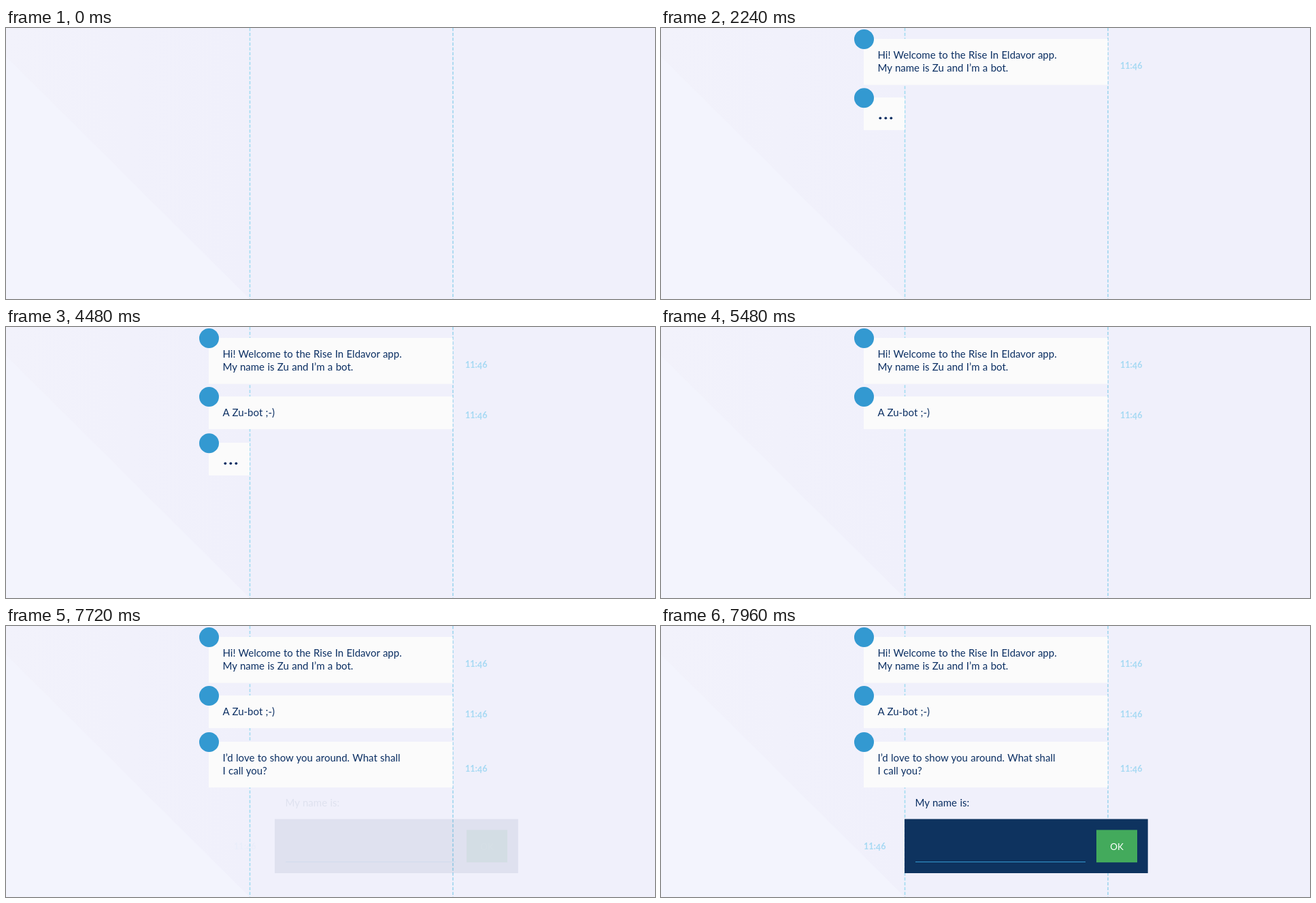
Recreate the animation shown at these times as an HTML page. Size 954x398 px, loop 8000 ms.

```html
<!DOCTYPE html>
<html lang="en">
<head>
<meta charset="utf-8">
<title>Chat intro</title>
<style>
  html, body { margin: 0; width: 100%; height: 100%; overflow: hidden; background: #f0f0fb; }
  svg { display: block; width: 100%; height: 100%; }
  text { font: 15px Lato, "Open Sans", sans-serif; word-spacing: 0.5px; fill: #0b2f63; white-space: pre; }
  .stamp { font-size: 12.6px; font-weight: 700; fill: #a6d9f3; }
  .ok { font-size: 13.4px; fill: #fff; text-anchor: middle; }
  .guide { stroke-width: 1.6; stroke-dasharray: 4.6 2.5; }
</style>
</head>
<body>
<svg id="stage" viewBox="0 0 954 398">
  <defs>
    <linearGradient id="haze">
      <stop stop-color="#f2f2fb"/>
      <stop offset="1" stop-color="#f0f0fb"/>
    </linearGradient>
  </defs>
  <rect width="954" height="398" fill="#f0f0fb"/>
  <rect width="358" height="398" fill="url(#haze)"/>
  <path d="M0 42L358 398H0Z" fill="#f3f4fd"/>
  <path class="guide" d="M358.5 0V398" stroke="#a2dcf1"/>
  <path class="guide" d="M657 0V398" stroke="#9fd5ee"/>
</svg>
<script>
const LOOP = 8000, STEP = 80, SLIDE = 240, SHIFT = 40;
const stage = document.getElementById("stage");

function add(parent, tag, attrs, text) {
  const el = document.createElementNS("http://www.w3.org/2000/svg", tag);
  for (const key in attrs) el.setAttribute(key, attrs[key]);
  if (text) el.textContent = text;
  parent.append(el);
  return el;
}

const group = () => add(stage, "g", {});
const box = (g, x, y, width, height, fill) => add(g, "rect", { x, y, width, height, fill });
const avatar = (g, y) => add(g, "circle", { cx: 298.5, cy: y, r: 14.5, fill: "#3399d1" });
const label = (g, x, y, text) => add(g, "text", { x, y }, text);

// The 4 hangs below the baseline, like an old-style numeral.
function stamp(g, x, y) {
  const el = add(g, "text", { x, y, class: "stamp" }, "11:");
  add(el, "tspan", { dy: 2 }, "4");
  add(el, "tspan", { dy: -2 }, "6");
}

function message(y, height, stampY, lines) {
  const g = group();
  box(g, 298, y, 358.5, height, "#fbfbfb");
  lines.forEach((line, i) => label(g, 318.5, y + 29 + i * 19, line));
  stamp(g, 675, stampY);
  avatar(g, y + 0.4);
  return g;
}

function typing(y) {
  const g = group();
  box(g, 298, y, 60, 48, "#fbfbfb");
  for (let i = 0; i < 3; i++)
    add(g, "circle", { cx: 322.3 + i * 8, cy: y + 30.3, r: 1.9, fill: "#0b2f63" });
  avatar(g, y + 0.8);
  return g;
}

function nameForm() {
  const g = group();
  label(g, 373.5, 265, "My name is:");
  box(g, 358, 283.5, 357.7, 79.5, "#0e335f");
  box(g, 374, 346, 250, 1, "#3399d1");
  box(g, 640, 299.5, 60, 47.7, "#43aa5c");
  add(g, "text", { x: 670, y: 329, class: "ok" }, "OK");
  stamp(g, 298, 327.5);
  return g;
}

const waits = [
  { el: typing(102), from: 2240, to: 3240 },
  { el: typing(170), from: 4480, to: 5480 }
];

// lead: time the slide has already run when it first shows
const entries = [
  { el: message(16, 67.6, 59.5, ["Hi! Welcome to the Rise In Eldavor app.", "My name is Zu and I’m a bot."]),
    from: 0, lead: 0, side: -1 },
  { el: message(102, 48, 133.6, ["A Zu-bot ;-)"]), from: 3240, lead: 0, side: -1 },
  { el: message(170, 67.2, 213.5, ["I’d love to show you around. What shall", "I call you?"]),
    from: 5480, lead: 0, side: -1 },
  { el: nameForm(), from: 7720, lead: 48, side: 1 }
];

const smooth = p => p * p * (3 - 2 * p);
const show = (el, on) => el.setAttribute("display", on ? "inline" : "none");

function draw(t) {
  for (const w of waits) show(w.el, t >= w.from && t < w.to);
  for (const { el, from, lead, side } of entries) {
    show(el, t >= from);
    const run = Math.floor((t - from) / STEP) * STEP + lead;
    const p = smooth(Math.min(1, Math.max(0, run / (SLIDE + lead))));
    el.setAttribute("transform", `translate(${side * SHIFT * (1 - p)} 0)`);
    el.setAttribute("fill-opacity", p);
  }
}

const start = performance.now();
function tick() {
  draw((performance.now() - start) % LOOP);
  requestAnimationFrame(tick);
}
tick();
</script>
</body>
</html>
```
